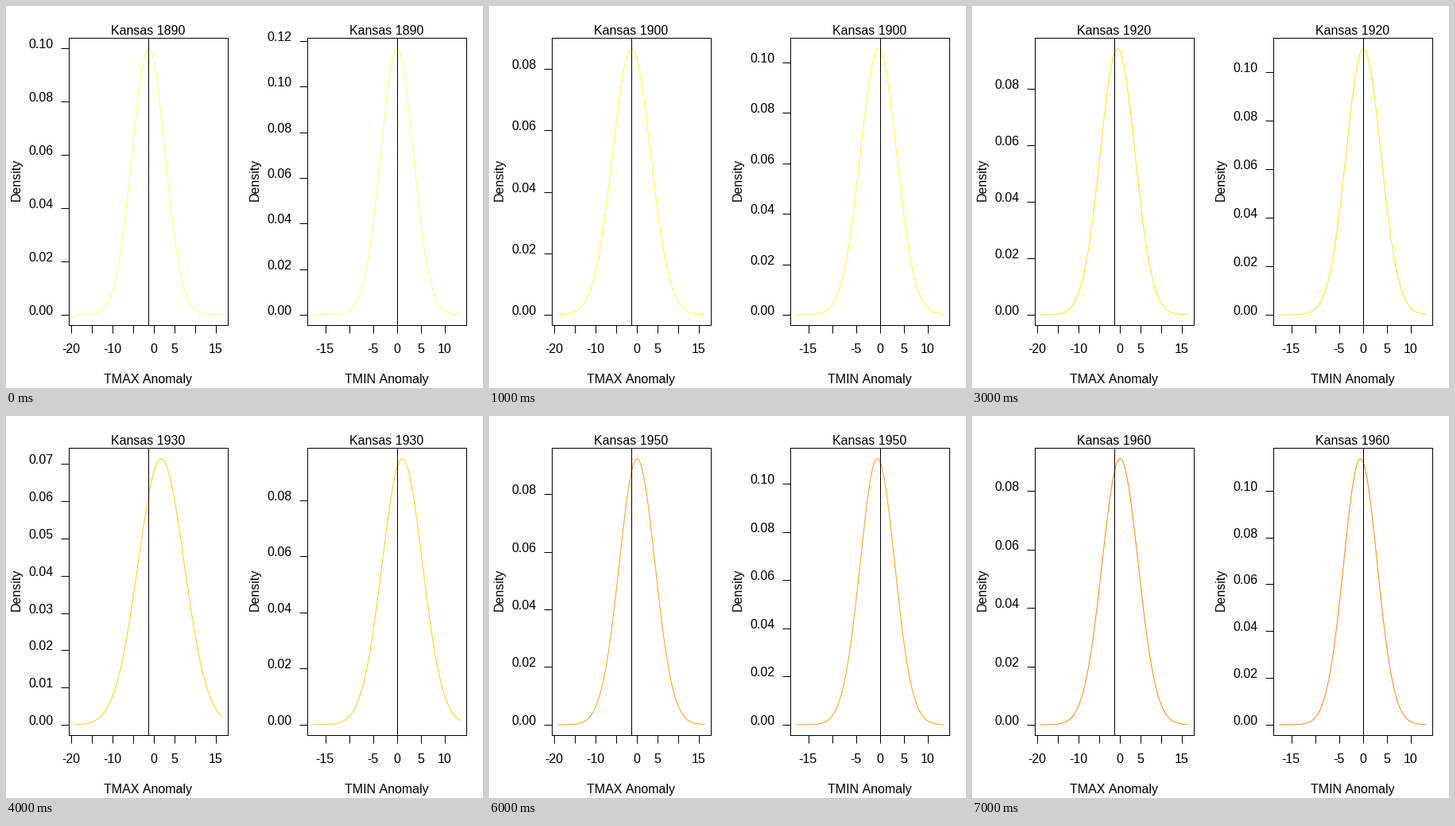
Animation of 600 by 480 pixels, one loop 8000 ms. Source, as a matplotlib script:

```python
import colorsys

import matplotlib.pyplot as plt
import numpy as np
from matplotlib.animation import FuncAnimation

WIDTH, HEIGHT, DPI = 600, 480, 100
PX = 72 / DPI
FONT = 16
LINE = 1.2 * FONT
DECADES = 8

# Plot box of one panel, from margins given in text lines
LEFT, RIGHT = 4.1 * LINE, WIDTH / 2 - 1.1 * LINE
TOP, BOTTOM = 2.1 * LINE, HEIGHT - 4.1 * LINE
PAD_X = (RIGHT - LEFT) * 0.04 / 1.08
PAD_Y = (BOTTOM - TOP) * 0.04 / 1.08

plt.rcParams.update({
    "font.family": "Liberation Sans",
    "font.size": FONT * PX,
    "text.kerning_factor": 6,
})
fig = plt.figure(figsize=(WIDTH / DPI, HEIGHT / DPI), dpi=DPI, facecolor="white")
ax = fig.add_axes([0, 0, 1, 1])


def warm_spell(t):
    return np.exp(-1.95 * (t - 3.75) ** 2)


def day_mean(t):
    return -1.25 + 1.35 / (1 + np.exp(-6 * (t - 3.5))) + 2 * warm_spell(t)


def night_mean(t):
    return -0.55 * (1 - np.exp(-t)) + 1.85 * warm_spell(t)


# Spread of the anomalies at key decades, interpolated between them
KEYS = [0, 2, 3, 4, 5, 7]
DAY_SPREAD = [4.00, 5.21, 4.23, 5.59, 4.27, 4.38]
NIGHT_SPREAD = [3.42, 4.15, 3.64, 4.21, 3.72, 3.51]


def heat(t):
    """Pale yellow, through yellow, towards red."""
    if t < 2:
        return colorsys.hsv_to_rgb(1 / 6, 0.625 + 0.25 * t, 1)
    return colorsys.hsv_to_rgb((13 - t) / 66, 1, 1)


def line(x, y, color="black"):
    ax.plot(x, y, color=color, lw=PX, solid_capstyle="butt")


def label(x, y, text, ha="center", **kw):
    ax.text(x, y, text, ha=ha, va="baseline", **kw)


def x_axis(to_x, low, high):
    """Ticks every five units; labels that would crowd the last one are left out."""
    free = 0
    for value in range(-20, 20, 5):
        x = to_x(value)
        if not low - 1 < value < high:
            continue
        line([x, x], [BOTTOM, BOTTOM + LINE / 2])
        text = str(value)
        half = FONT * (0.556 * len(text) - 0.223 * (value < 0)) / 2
        if x - half >= free:
            label(x - 0.3, 436, text)
            free = x + half + 0.833 * FONT


def y_axis(to_y, left, peak):
    step = 0.01 if peak < 0.072 else 0.02
    for value in np.arange(0, 0.2, step):
        y = to_y(value)
        if y < TOP:
            break
        line([left - LINE / 2, left], [y, y])
        label(left - LINE, y, f"{value:.2f}", ha="right")


def draw_panel(t, name, shift, low, high, mean, spreads):
    left, right = LEFT + shift, RIGHT + shift
    middle = (left + right) / 2
    sigma = np.interp(t, KEYS, spreads)
    peak = 1 / (sigma * np.sqrt(2 * np.pi))
    values = np.linspace(low, high, 201)
    density = peak * np.exp(-((values - mean(t)) / sigma) ** 2 / 2)
    floor = density.min()

    def to_x(v):
        return left + PAD_X + (v - low) / (high - low) * (right - left - 2 * PAD_X)

    def to_y(d):
        return BOTTOM - PAD_Y - (d - floor) / (peak - floor) * (BOTTOM - TOP - 2 * PAD_Y)

    line(to_x(values), to_y(density), heat(t))
    start = to_x(mean(0))
    line([start, start], [TOP, BOTTOM])
    line([left, right, right, left, left], [TOP, TOP, BOTTOM, BOTTOM, TOP])
    x_axis(to_x, low, high)
    y_axis(to_y, left, peak)

    label(middle, 36, f"Kansas {1890 + 10 * t}")
    label(middle, 474, f"{name} Anomaly")
    label(left - 3.2 * LINE, 218, "Density", rotation=90, rotation_mode="anchor")


def draw(t):
    ax.clear()
    ax.set(xlim=(0, WIDTH), ylim=(HEIGHT, 0))
    ax.axis("off")
    draw_panel(t, "TMAX", 0, -19.22, 16.52, day_mean, DAY_SPREAD)
    draw_panel(t, "TMIN", WIDTH / 2, -17.57, 13.22, night_mean, NIGHT_SPREAD)


anim = FuncAnimation(fig, draw, frames=DECADES, interval=1000,
                     init_func=lambda: None, repeat=True, repeat_delay=0)
plt.show()
```
